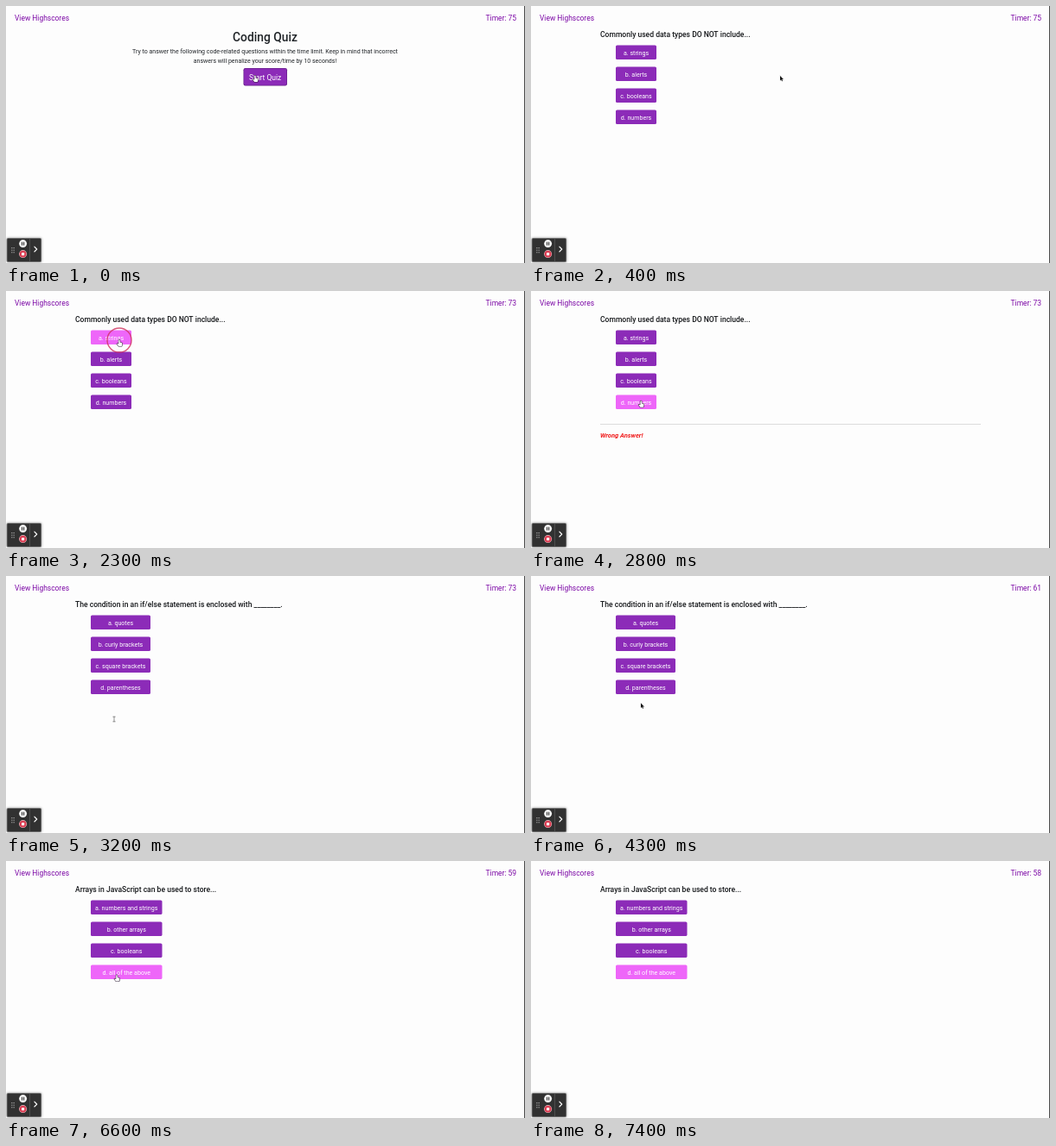
Animation, 600 px wide and 298 px high, one loop 8000 ms. Source, as an HTML page with a canvas:

```html
<!DOCTYPE html>
<html lang="en">
<head>
<meta charset="utf-8">
<title>Coding Quiz</title>
<style>
  html, body { margin: 0; width: 100%; height: 100%; overflow: hidden; background: #fdfdfd; }
  canvas { display: block; }
</style>
</head>
<body>
<canvas id="stage" width="600" height="298"></canvas>
<script>
const ctx = document.getElementById('stage').getContext('2d');
const LOOP = 8000, STEP = 100;
const FONT = 'Roboto, "Liberation Sans", sans-serif';
const PURPLE = '#8c2bb8', PINK = '#ee66f9', LINK = '#7c08a6', INK = '#16181b';

const questions = [
  { from: 400, width: 47, title: 'Commonly used data types DO NOT include...',
    answers: ['a. strings', 'b. alerts', 'c. booleans', 'd. numbers'] },
  { from: 3100, width: 69, title: 'The condition in an if/else statement is enclosed with ________.',
    answers: ['a. quotes', 'b. curly brackets', 'c. square brackets', 'd. parentheses'] },
  { from: 6600, width: 82.5, title: 'Arrays in JavaScript can be used to store...',
    answers: ['a. numbers and strings', 'b. other arrays', 'c. booleans', 'd. all of the above'] }
];
const messages = [
  { from: 2400, to: 3100, text: 'Wrong Answer!', color: '#f01c1c' },
  { from: 5400, to: 6600, text: 'Correct Answer!', color: '#22e01c' }
];
const clicks = [200, 2300, 5300];
const ticks = [[1300, 74], [2300, 73], [3300, 62], [4300, 61], [5300, 60], [6300, 59], [7300, 58]];

// Pointer tip: time, x, y
const path = [
  [0, 288, 81], [400, 288, 81], [1100, 252, 82], [1300, 252, 82], [2000, 131, 57],
  [2500, 131, 57], [3000, 125, 166], [3600, 125, 166], [4200, 127, 147.5],
  [4600, 127, 147.5], [5100, 128, 132.5], [LOOP, 128, 132.5]
];

function pointerAt(t) {
  const i = path.findIndex((p, k) => k > 0 && t <= p[0]);
  const [t0, x0, y0] = path[i - 1], [t1, x1, y1] = path[i];
  const u = (t - t0) / (t1 - t0), e = u * u * (3 - 2 * u);
  return { x: x0 + (x1 - x0) * e, y: y0 + (y1 - y0) * e };
}

function text(str, x, y, size, color, align = 'left', style = '400') {
  ctx.font = `${style} ${size}px ${FONT}`;
  ctx.fillStyle = color;
  ctx.textAlign = align;
  ctx.fillText(str, x, y);
}

function box(x, y, w, h, r, fill) {
  ctx.beginPath();
  ctx.roundRect(x, y, w, h, r);
  ctx.fillStyle = fill;
  ctx.fill();
}

function disc(x, y, r, fill) {
  ctx.beginPath();
  ctx.arc(x, y, r, 0, Math.PI * 2);
  ctx.fillStyle = fill;
  ctx.fill();
}

function shape(d, x, y, fill, stroke, width) {
  const p = new Path2D(d);
  ctx.save();
  ctx.translate(x, y);
  ctx.lineWidth = width;
  ctx.lineJoin = ctx.lineCap = 'round';
  ctx.strokeStyle = stroke;
  ctx.stroke(p);
  if (fill) {
    ctx.fillStyle = fill;
    ctx.fill(p);
  }
  ctx.restore();
}

function drawIntro() {
  text('Coding Quiz', 299.5, 41, 13.8, '#212529', 'center', '500');
  text('Try to answer the following code-related questions within the time limit. Keep in mind that incorrect',
    299.5, 55.3, 7, '#212529', 'center');
  text('answers will penalize your score/time by 10 seconds!', 299.5, 65.5, 7, '#212529', 'center');
  box(274.5, 72, 50.5, 20.5, 2.2, '#67208a');
  box(275.2, 72.7, 49.1, 19.1, 1.7, PURPLE);
  text('Start Quiz', 299.7, 85.5, 8.5, '#fff', 'center');
}

// Returns whether the pointer rests on an answer.
function drawQuestion({ title, width, answers }, pointer) {
  let hit = false;
  text(title, 80, 36, 8.55, INK, 'left', '500');
  answers.forEach((answer, i) => {
    const y = 45.5 + i * 25;
    const over = pointer.x > 98 && pointer.x < 98 + width && pointer.y > y && pointer.y < y + 16.5;
    hit = hit || over;
    box(98, y, width, 16.5, 1.6, over ? PINK : PURPLE);
    text(answer, 98 + width / 2, y + 11, 7.1, '#fff', 'center');
  });
  return hit;
}

function drawMessage({ text: str, color }) {
  ctx.fillStyle = '#dcdcdc';
  ctx.fillRect(80, 154, 440, 1);
  text(str, 80, 169.7, 7.5, color, 'left', 'italic 700');
}

function drawPointer(kind, { x, y }) {
  if (kind === 'hand') {
    shape('M-.7 0Q0 -.8 .7 0V2.6L3 3.3Q3.6 3.6 3.4 4.6L2.7 7H-.8L-2.8 4.4Q-2.6 3.4 -.7 4.6Z',
      x, y, '#fff', '#33263a', 1.1);
  } else if (kind === 'beam') {
    shape('M-1.2 -2.8H1.2M0 -2.8V2.8M-1.2 2.8H1.2', x, y, null, '#777', .8);
  } else {
    shape('M0 0V5.4L1.2 4.3L2.1 6.2L3 5.8L2.1 3.9H3.8Z', x, y, '#111', '#ddd', .8);
  }
}

function drawRecorder() {
  ctx.save();
  ctx.shadowColor = 'rgba(0,0,0,.45)';
  ctx.shadowBlur = 3;
  box(.8, 269, 40.2, 28, 1.5, '#767676');
  ctx.restore();
  box(1.5, 269.7, 38.8, 26.6, 1.2, '#313131');
  ctx.fillStyle = '#bbb';
  for (let i = 0; i < 6; i++) ctx.fillRect(6.3 + (i % 2) * 2.3, 280 + (i >> 1) * 2.6, 1.1, 1.1);
  ctx.fillStyle = '#555';
  ctx.fillRect(27, 270, .8, 26);
  disc(19.6, 275.6, 4.5, '#f4f4f4');
  ctx.fillStyle = '#333';
  ctx.fillRect(18, 273.7, 1.1, 3.8);
  ctx.fillRect(20.1, 273.7, 1.1, 3.8);
  disc(19.6, 287.6, 4.5, '#f0c4cb');
  disc(19.6, 287.6, 3.9, '#d93b50');
  box(18, 286, 3.2, 3.2, .4, '#fff');
  shape('M-1.4 -2.8L1.4 0L-1.4 2.8', 34.3, 282, null, '#fff', 1.2);
}

function render(t) {
  const pointer = pointerAt(t);
  const question = questions.filter(q => t >= q.from).pop();
  const message = messages.find(m => t >= m.from && t < m.to);
  const tick = ticks.filter(k => t >= k[0]).pop();

  ctx.fillStyle = '#fdfdfd';
  ctx.fillRect(0, 0, 600, 298);
  ctx.fillStyle = '#4a4a4a';
  ctx.fillRect(599, 0, 1, 298);
  text('View Highscores', 10, 17, 8.45, LINK);
  text('Timer: ' + (tick ? tick[1] : 75), 590, 16.7, 8.45, LINK, 'right');

  let kind = 'arrow';
  if (!question) {
    drawIntro();
    kind = 'hand';
  } else if (drawQuestion(question, pointer)) {
    kind = 'hand';
  }
  if (message) drawMessage(message);
  if (t >= 2900 && t < 3600) kind = 'beam';

  if (clicks.some(c => t >= c && t < c + 200)) {
    ctx.beginPath();
    ctx.arc(pointer.x, pointer.y, 14, 0, Math.PI * 2);
    ctx.strokeStyle = 'rgba(208,48,92,.8)';
    ctx.lineWidth = 1.4;
    ctx.stroke();
  }
  if (t < 6700) drawPointer(kind, pointer);
  drawRecorder();
}

function frame() {
  const t = performance.now() % LOOP;
  render(Math.floor(t / STEP) * STEP);
  requestAnimationFrame(frame);
}
frame();
</script>
</body>
</html>
```
